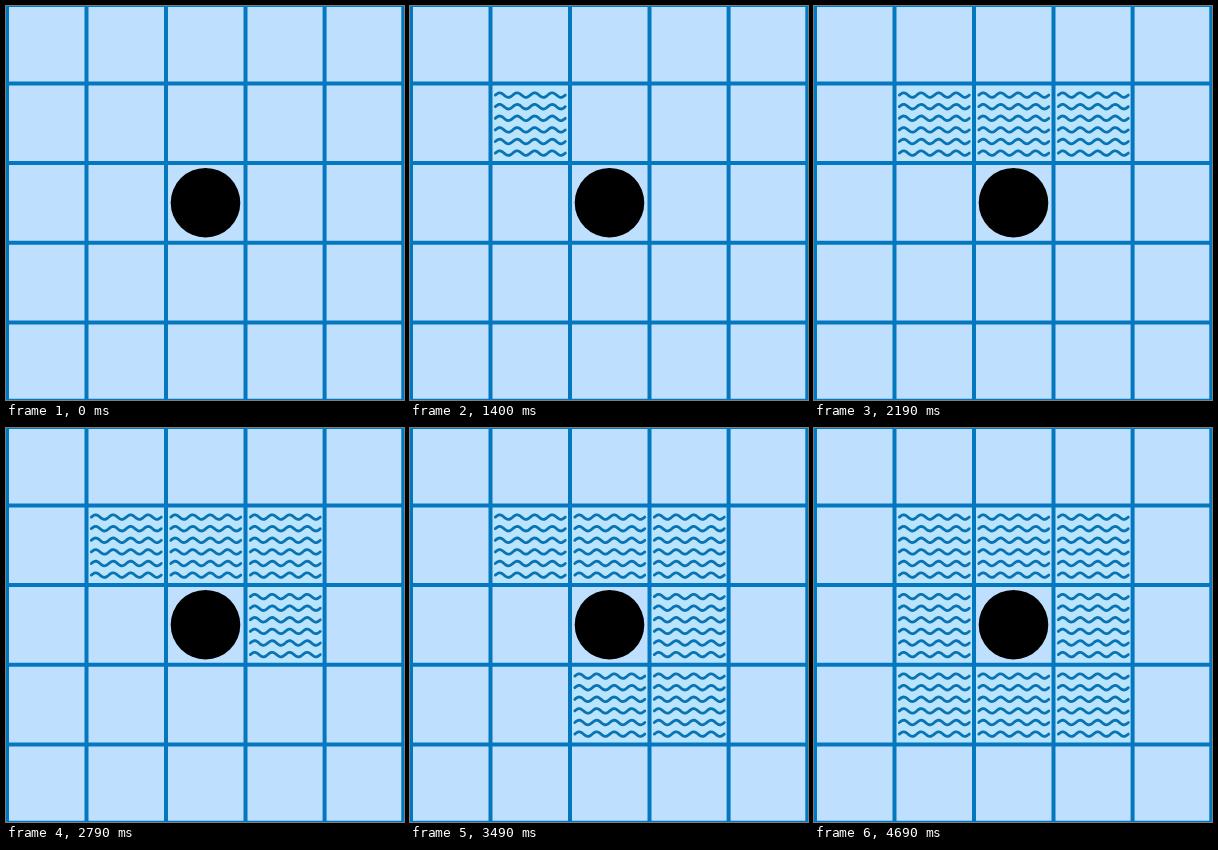
Recreate the animation shown at these times as an HTML page. Size 398x394 px, loop 4.79 s.

```html
<!DOCTYPE html>
<html lang="en">
<head>
<meta charset="utf-8">
<title>Filling the ring</title>
<style>
  html, body { margin: 0; width: 100%; height: 100%; overflow: hidden; background: #bfdfff; }
  svg { display: block; width: 100vw; height: 100vh; }
</style>
</head>
<body>
<svg id="stage" viewBox="0 0 398 394" preserveAspectRatio="none"></svg>
<script>
const LOOP = 4790, FIRST = 1295, STEP = 398, CELL = 79.5;
const LINE = '#0478be', WAVE = '#0874b4';
const stage = document.getElementById('stage');

function add(parent, tag, attrs) {
  const el = document.createElementNS('http://www.w3.org/2000/svg', tag);
  for (const key in attrs) el.setAttribute(key, attrs[key]);
  return parent.appendChild(el);
}

// One row of ripples: four periods, rising from the left end to a crest.
function ripple(x, y) {
  const width = 70, amp = 2.3, periods = 4;
  let d = '';
  for (let i = 0; i <= width; i++) {
    const dy = -amp * Math.sin(2 * Math.PI * periods * i / width);
    d += (i ? 'L' : 'M') + (x + i) + ' ' + (y + dy).toFixed(2);
  }
  return d;
}

function waterTile(col, row) {
  const x = 80.5 + (col - 1) * CELL, y = 77.5 + (row - 1) * CELL;
  const tile = add(stage, 'g', {});
  add(tile, 'rect', { x: x + 2, y: y + 2, width: CELL - 4, height: CELL - 4, fill: '#bae3fc' });
  let d = '';
  for (let i = 0; i < 6; i++) d += ripple(x + 4.8, y + 11.6 + i * 11.6);
  add(tile, 'path', { d, fill: 'none', stroke: WAVE, 'stroke-width': 2.8, 'stroke-linecap': 'round' });
  return tile;
}

add(stage, 'rect', { width: 398, height: 394, fill: '#bfdfff' });

// Clockwise from the upper left neighbour.
const tiles = [[1, 1], [2, 1], [3, 1], [3, 2], [3, 3], [2, 3], [1, 3], [1, 2]]
  .map(([col, row]) => waterTile(col, row));

let grid = '';
for (const x of [1, 80.5, 160, 239.5, 318.6, 397.3]) grid += `M${x} 0V394`;
for (const y of [-1, 77.5, 157, 236.7, 316.4, 394.7]) grid += `M0 ${y}H398`;
add(stage, 'path', { d: grid, fill: 'none', stroke: LINE, 'stroke-width': 4 });
add(stage, 'circle', { cx: 199.5, cy: 196.7, r: 34.8, fill: '#000' });

function render(time) {
  tiles.forEach((tile, i) => {
    tile.setAttribute('visibility', time >= FIRST + i * STEP ? 'visible' : 'hidden');
  });
}

const start = performance.now();
function tick() {
  render((performance.now() - start) % LOOP);
  requestAnimationFrame(tick);
}
render(0);
requestAnimationFrame(tick);
</script>
</body>
</html>
```
